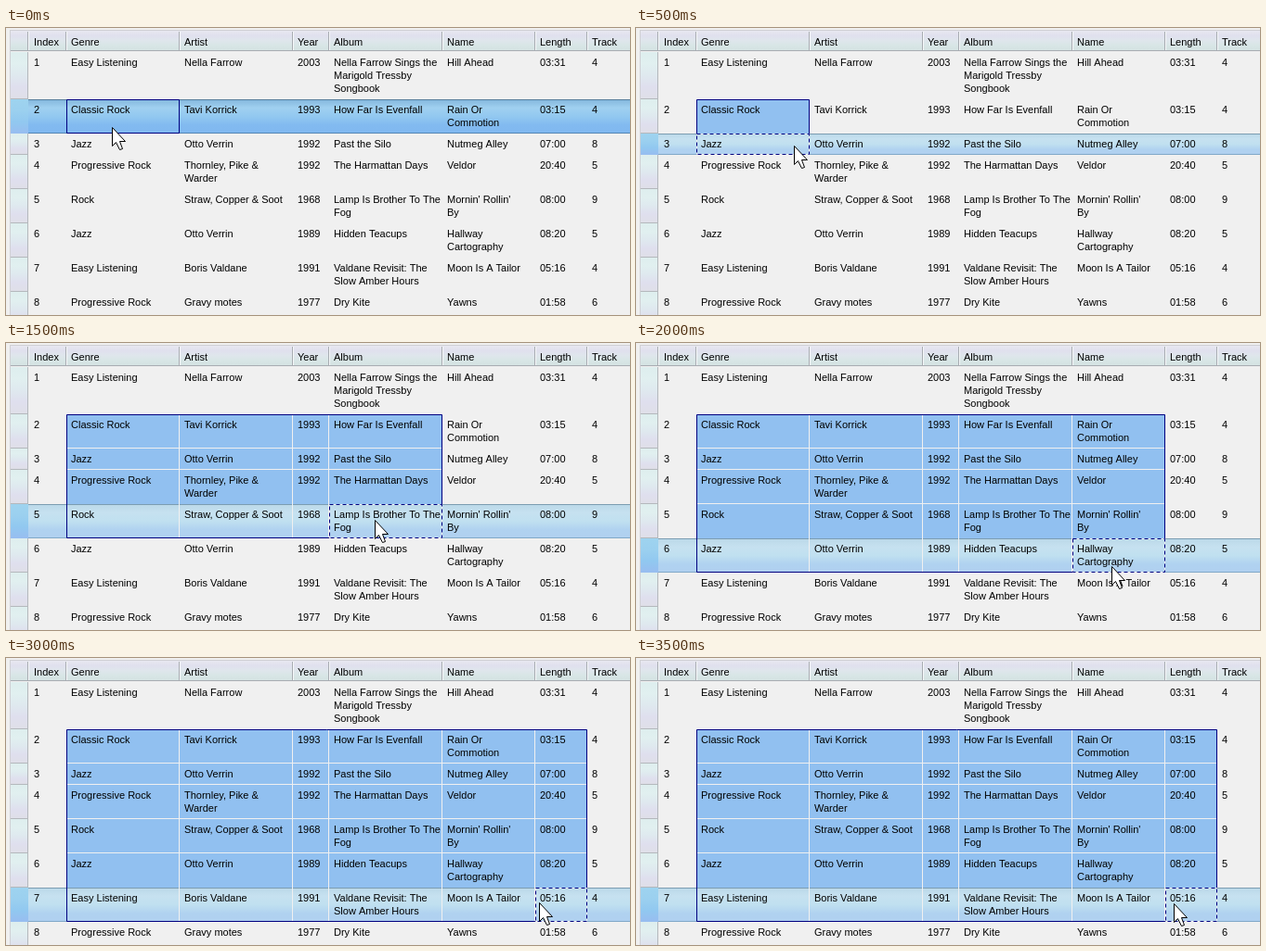
Animation, 672 px wide and 310 px high, one loop 4000 ms. Source, as an HTML page with a canvas:

```html
<!DOCTYPE html>
<html>
<head>
<meta charset="utf-8">
<style>
html, body { margin: 0; width: 672px; height: 310px; overflow: hidden; background: #f0f0f0; }
canvas { display: block; }
</style>
</head>
<body>
<canvas id="stage" width="672" height="310"></canvas>
<script>
const ctx = document.getElementById('stage').getContext('2d');
const titles = ['Index', 'Genre', 'Artist', 'Year', 'Album', 'Name', 'Length', 'Track'];
const colX = [24, 65, 187, 309, 348, 470, 570, 626, 690];
const rowY = [26, 77, 114, 137, 174, 211, 248, 285, 322];
const rows = [
  ['1', 'Easy Listening', 'Nella Farrow', '2003', 'Nella Farrow Sings the\nMarigold Tressby\nSongbook', 'Hill Ahead', '03:31', '4'],
  ['2', 'Classic Rock', 'Tavi Korrick', '1993', 'How Far Is Evenfall', 'Rain Or\nCommotion', '03:15', '4'],
  ['3', 'Jazz', 'Otto Verrin', '1992', 'Past the Silo', 'Nutmeg Alley', '07:00', '8'],
  ['4', 'Progressive Rock', 'Thornley, Pike &\nWarder', '1992', 'The Harmattan Days', 'Veldor', '20:40', '5'],
  ['5', 'Rock', 'Straw, Copper & Soot', '1968', 'Lamp Is Brother To The\nFog', "Mornin' Rollin'\nBy", '08:00', '9'],
  ['6', 'Jazz', 'Otto Verrin', '1989', 'Hidden Teacups', 'Hallway\nCartography', '08:20', '5'],
  ['7', 'Easy Listening', 'Boris Valdane', '1991', 'Valdane Revisit: The\nSlow Amber Hours', 'Moon Is A Tailor', '05:16', '4'],
  ['8', 'Progressive Rock', 'Gravy motes', '1977', 'Dry Kite', 'Yawns', '01:58', '6']
];
// Focused row and column, then pointer tip, one entry per half second
const steps = [
  [1, 1, 114, 107], [2, 1, 170, 127], [3, 2, 313, 178], [4, 4, 397, 191],
  [5, 5, 512, 241], [5, 5, 539, 242], [6, 6, 574, 264], [6, 6, 579, 265]
];
const titleShades = ['#e8e8f0', '#e0e0ee', '#dfe6ec', '#d8e6e6', '#d4e2e2'];
const headShades = ['#deeeee', '#e1f0f0', '#dfe9ef', '#dfdfee', '#dfdfe8'];
const activeShades = ['#9ed3ef', '#9bd0ef', '#91c8f0', '#98bdf0'];
const singleShades = ['#82b6dc', '#a0d0f0', '#92c8f0', '#82baf0', '#80b8f0'];
const rangeShades = ['#bad8e8', '#c6e1f0', '#c0e0f0', '#b0d2f0', '#b0d0f0'];
const gridColor = '#f0f0f0', navy = '#000080';

function fill(x, y, w, h, color) {
  ctx.fillStyle = color;
  ctx.fillRect(x, y, w, h);
}

function shade(x, y, w, h, colors) {
  const g = ctx.createLinearGradient(0, y, 0, y + h);
  colors.forEach((c, i) => g.addColorStop(i / (colors.length - 1), c));
  fill(x, y, w, h, g);
}

function line(points, color, dash = []) {
  ctx.strokeStyle = color;
  ctx.lineWidth = 1;
  ctx.setLineDash(dash);
  ctx.beginPath();
  points.forEach(([x, y]) => ctx.lineTo(x + .5, y + .5));
  ctx.stroke();
  ctx.setLineDash([]);
}

function text(str, x, y) {
  ctx.fillStyle = '#000';
  str.split('\n').forEach((s, i) => ctx.fillText(s, x, y + i * 14));
}

function drawHeaders(active) {
  shade(5, 3, 667, 21, titleShades);
  fill(4, 2, 668, 1, '#d0d0d4');
  fill(4, 24, 668, 1, '#a8acb2');
  fill(4, 2, 1, 308, '#d0d0d4');
  for (const x of colX) {
    fill(x - 1, 4, 1, 20, '#a8acb2');
    fill(x, 4, 1, 20, '#f6f8fa');
  }
  rows.forEach((_, r) => {
    const y = rowY[r], h = rowY[r + 1] - y;
    if (r === active) {
      shade(5, y, 19, h, activeShades);
      return;
    }
    shade(5, y, 18, h - 1, headShades);
    fill(5, y + h - 1, 19, 1, '#b4b8bc');
    fill(23, y, 1, h, '#b4b8bc');
  });
}

function drawRange(row, col) {
  const top = rowY[row], bottom = rowY[row + 1] - 1;
  const left = colX[col], right = colX[col + 1] - 1;
  const single = row === 1;
  if (!single) {
    fill(65, 77, right - 64, top - 77, '#91c0f0');
    for (let r = 2; r < row; r++) fill(65, rowY[r] - 1, right - 64, 1, gridColor);
  }
  shade(24, top, 648, bottom - top + 1, single ? singleShades : rangeShades);
  fill(24, top, 648, 1, single ? '#587f9c' : '#7c9db2');
  fill(24, bottom, 648, 1, single ? '#5486b4' : '#80a8c8');
  if (single) {
    line([[65, top], [right, top], [right, bottom], [65, bottom], [65, top]], navy);
    return;
  }
  for (let c = 2; c <= col; c++) fill(colX[c] - 1, 77, 1, bottom - 77, gridColor);
  line([[left, bottom], [65, bottom], [65, 77], [right, 77], [right, top]], navy);
  const box = [[left, top], [right, top], [right, bottom], [left, bottom], [left, top]];
  line(box, gridColor);
  line(box, navy, [4, 3]);
}

function drawPointer(x, y) {
  const shape = [[0, 0], [0, 20], [4, 16], [8, 24], [11, 23], [8, 15], [14, 15]];
  ctx.beginPath();
  shape.forEach(([dx, dy]) => ctx.lineTo(x + dx + .5, y + dy + .5));
  ctx.closePath();
  ctx.fillStyle = '#fff';
  ctx.fill();
  ctx.strokeStyle = '#000';
  ctx.lineWidth = 1;
  ctx.stroke();
}

function draw([row, col, x, y]) {
  fill(0, 0, 672, 310, '#f0f0f0');
  drawHeaders(row);
  drawRange(row, col);
  ctx.font = '11px "Liberation Sans", Arial, sans-serif';
  const textX = c => colX[c] + (c === 0 ? 6 : 5);
  titles.forEach((t, c) => text(t, textX(c), 19));
  rows.forEach((cells, r) => cells.forEach((t, c) => text(t, textX(c), rowY[r] + 15)));
  drawPointer(x, y);
}

function tick() {
  draw(steps[Math.floor(performance.now() % 4000 / 500)]);
  requestAnimationFrame(tick);
}
tick();
</script>
</body>
</html>
```
